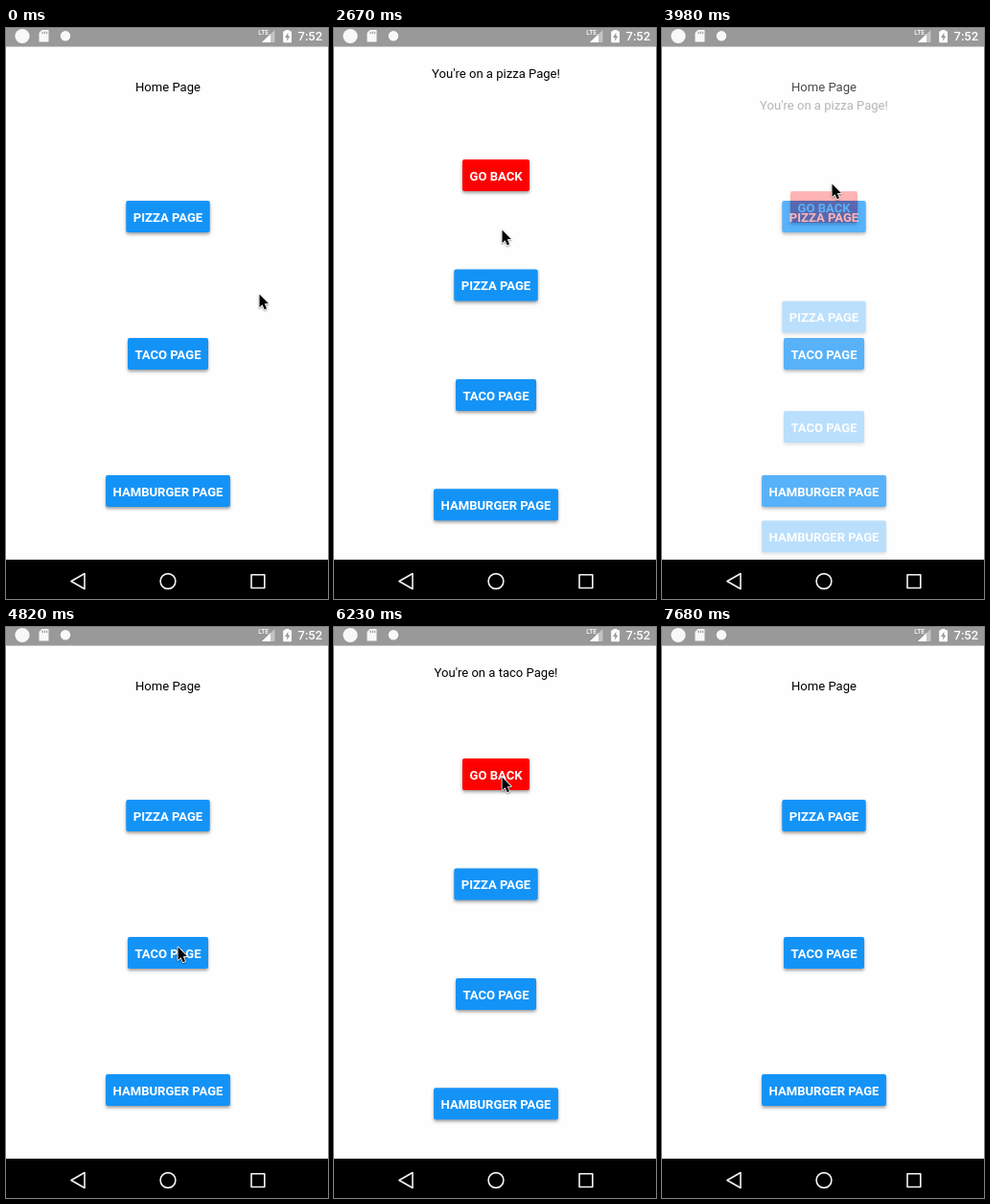
Write an HTML page with a canvas that moves like this. It is 336 px wide and 595 px high and loops after 8.15 s.

```html
<!DOCTYPE html>
<html lang="en">
<head>
<meta charset="utf-8">
<title>Page navigation</title>
<style>
html, body { margin: 0; width: 100%; height: 100%; overflow: hidden; background: #fefefe; }
canvas { display: block; width: 336px; height: 595px; }
</style>
</head>
<body>
<canvas id="stage"></canvas>
<script>
const W = 336, H = 595, MID = 169, LOOP = 8150;
const BLUE = '#1493f7', RED = '#ff0000', PAPER = '#fefefe';
const FONT = 'Roboto, "Noto Sans", sans-serif';
const scale = window.devicePixelRatio || 1;

function makeContext(canvas) {
  canvas.width = W * scale;
  canvas.height = H * scale;
  const c = canvas.getContext('2d');
  c.scale(scale, scale);
  return c;
}
const ctx = makeContext(document.getElementById('stage'));
const layer = makeContext(document.createElement('canvas'));

// The screen refreshes in bursts: [start, end, steps]
const bursts = [
  [540, 1240, 12], [2070, 2250, 4], [2670, 3440, 13], [3500, 3500, 1],
  [3860, 4040, 4], [4340, 4820, 9], [5470, 5590, 3], [5890, 6450, 11],
  [6870, 7680, 14]
];

// Page changes: [start, end, page, opening]
const changes = [
  [2021, 2250, 'pizza', true], [3769, 4040, 'pizza', false],
  [5429, 5590, 'taco', true], [6779, 7050, 'taco', false]
];

const ease = {
  both: u => u * u * (3 - 2 * u),
  in: u => u * u,
  out: u => 1 - (1 - u) * (1 - u),
  line: u => u
};

// Pointer keys: [time, x, y, easing towards this key]
const pointer = [
  [476, 264.5, 277.5, 'line'],
  [1240, 176.5, 198.5, 'both'],
  [2610, 176.5, 198.5, 'line'],
  [2670, 175.5, 210.5, 'line'],
  [2990, 186, 284, 'out'],
  [3440, 176.5, 163.5, 'both'],
  [3500, 177.5, 162.5, 'line'],
  [4280, 177.5, 162.5, 'line'],
  [4820, 179.5, 333.5, 'both'],
  [5834, 179.5, 333.5, 'line'],
  [6230, 175.5, 156.5, 'both'],
  [6450, 170.5, 147.5, 'out'],
  [7040, 170.5, 147.5, 'line'],
  [7680, 246, 610, 'in']
];

function heldTime(t) {
  let held = 0;
  for (const [start, end, steps] of bursts) {
    if (t < start) break;
    if (t >= end) { held = end; continue; }
    const gap = (end - start) / (steps - 1);
    held = start + Math.floor((t - start) / gap) * gap;
  }
  return held;
}

function pointerAt(t) {
  let prev = pointer[0];
  for (const key of pointer) {
    if (t < key[0]) {
      if (key === prev) break;
      const k = ease[key[3]]((t - prev[0]) / (key[0] - prev[0]));
      return [1, 2].map(i => prev[i] + (key[i] - prev[i]) * k);
    }
    prev = key;
  }
  return [prev[1], prev[2]];
}

function overlayAt(t) {
  let state = { page: null, shown: 0 };
  for (const [start, end, page, opening] of changes) {
    if (t < start) break;
    if (t >= end) {
      state = { page, shown: opening ? 1 : 0 };
    } else {
      const u = Math.min(1, (t - start) / (opening ? 350 : 230));
      state = { page, shown: opening ? 1 - (1 - u) ** 5 : 1 - u ** 4 };
    }
  }
  return state;
}

function label(c, text, x, y, color, weight = 400, size = 13.07) {
  c.font = `${weight} ${size}px ${FONT}`;
  c.textAlign = 'center';
  c.fillStyle = color;
  c.fillText(text, x, y);
}

function polygon(c, points) {
  c.beginPath();
  points.forEach(([x, y]) => c.lineTo(x, y));
  c.closePath();
}

function disc(c, x, y, r) {
  c.beginPath();
  c.arc(x, y, r, 0, Math.PI * 2);
}

function shadow(c, alpha, blur, dy) {
  c.shadowColor = `rgba(0,0,0,${alpha})`;
  c.shadowBlur = blur * scale;
  c.shadowOffsetY = dy * scale;
}

function button(c, text, y, color) {
  c.font = `700 13.07px ${FONT}`;
  const w = c.measureText(text).width + 15;
  c.save();
  shadow(c, 0.38, 3.5, 2);
  c.fillStyle = color;
  c.beginPath();
  c.roundRect(MID - w / 2, y - 16.5, w, 33, 2);
  c.fill();
  c.restore();
  label(c, text, MID, y + 5.2, '#fff', 700);
}

function drawPage(c, name) {
  c.fillStyle = PAPER;
  c.fillRect(0, 0, W, H);
  const first = name ? 268 : 196.5;
  const gap = name ? 114.4 : 143;
  label(c, name ? `You're on a ${name} Page!` : 'Home Page', MID, name ? 52 : 66.4, '#000');
  if (name) button(c, 'GO BACK', 153.6, RED);
  ['PIZZA PAGE', 'TACO PAGE', 'HAMBURGER PAGE'].forEach((text, i) =>
    button(c, text, first + gap * i, BLUE));
}

function drawStatusBar(c) {
  c.fillStyle = '#999';
  c.fillRect(0, 0, W, 19.5);
  c.fillStyle = '#f8f8f8';
  disc(c, 17, 8.5, 7.6);
  c.fill();
  disc(c, 62, 8.2, 5.2);
  c.fill();

  // Memory card
  polygon(c, [[37.5, 2], [44.5, 2], [44.5, 14.5], [34.5, 14.5], [34.5, 5]]);
  c.fill();
  c.fillStyle = '#999';
  [37.5, 39.8, 42].forEach(x => c.fillRect(x, 3.7, 1.1, 2.5));

  // Signal
  c.fillStyle = '#c4c4c4';
  polygon(c, [[280.5, 2], [280.5, 15], [267, 15]]);
  c.fill();
  c.fillStyle = '#fff';
  polygon(c, [[276, 6.3], [276, 15], [267, 15]]);
  c.fill();
  label(c, 'LTE', 268.6, 7.2, '#fff', 500, 6.6);

  // Battery
  c.fillStyle = '#fff';
  c.fillRect(291.5, 2, 4, 2);
  c.beginPath();
  c.roundRect(289.2, 3.2, 8.8, 12, 0.8);
  c.fill();
  c.fillStyle = '#999';
  polygon(c, [[294.4, 4.8], [291, 10], [293.2, 10], [293.2, 13.6], [296.4, 8.6], [294.4, 8.6]]);
  c.fill();
  label(c, '7:52', 317.3, 13.4, '#fff', 500, 13);
}

function drawNavBar(c) {
  c.fillStyle = '#000';
  c.fillRect(0, 554, W, H - 554);
  c.strokeStyle = '#f4f4f4';
  c.lineWidth = 1.6;
  c.lineJoin = 'round';
  polygon(c, [[68, 576.5], [82, 568.5], [82, 584.5]]);
  c.stroke();
  disc(c, MID, 576.5, 7.9);
  c.stroke();
  c.strokeRect(256, 569.7, 13.8, 13.8);
}

function drawPointer(c, x, y) {
  c.save();
  c.translate(x, y);
  polygon(c, [[0, 0], [0, 13.4], [3, 10.7], [5.2, 15.8], [7.5, 14.8], [5.3, 9.8], [9.4, 9.6]]);
  c.lineJoin = 'round';
  c.lineWidth = 1.6;
  c.strokeStyle = '#fff';
  shadow(c, 0.4, 2, 1);
  c.stroke();
  shadow(c, 0, 0, 0);
  c.fillStyle = '#000';
  c.fill();
  c.restore();
}

function draw(time) {
  const t = heldTime(time % LOOP);
  const { page, shown } = overlayAt(t);
  drawPage(ctx, null);
  if (shown > 0) {
    drawPage(layer, page);
    ctx.globalAlpha = shown;
    ctx.drawImage(layer.canvas, 0, 46.7 * (1 - shown), W, H);
    ctx.globalAlpha = 1;
  }
  drawStatusBar(ctx);
  drawNavBar(ctx);
  drawPointer(ctx, ...pointerAt(t));
}

const origin = performance.now();
function tick() {
  draw(performance.now() - origin);
  requestAnimationFrame(tick);
}
tick();
</script>
</body>
</html>
```
